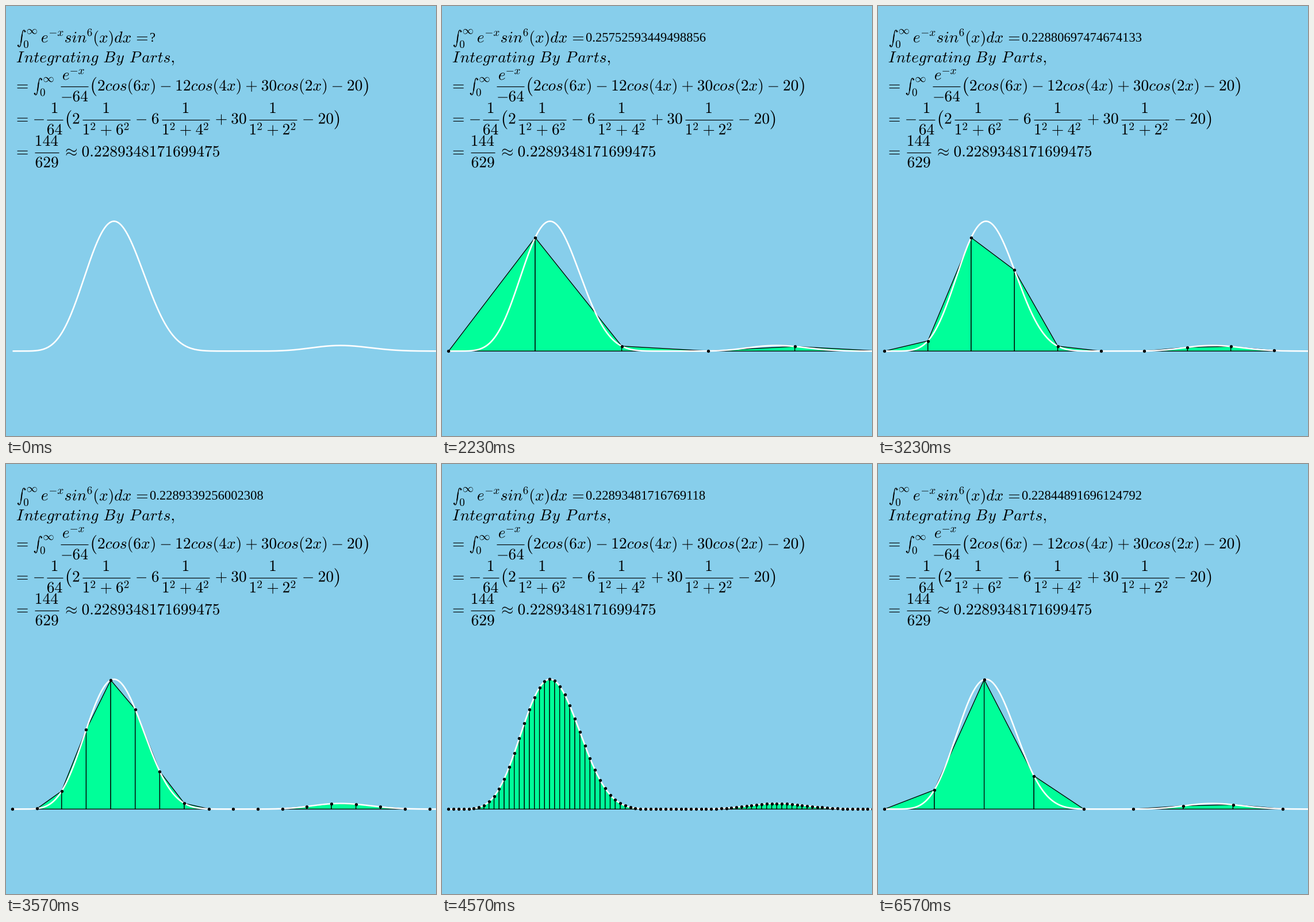
These frames come from a looping animation (748x748 px, 8 s). A matplotlib script:

```python
import math

import matplotlib.pyplot as plt
import numpy as np
from matplotlib.animation import FuncAnimation
from matplotlib.collections import PolyCollection
from matplotlib.patches import Circle, PathPatch
from matplotlib.path import Path
from matplotlib.textpath import TextPath

SIZE, DPI, FPS, FRAMES = 748, 64, 30, 240
PX = 72 / DPI                       # points per pixel
EM = 27.45                          # formula font size
SCRIPT = 0.7 * EM
AXIS = 0.25 * EM                    # height of the math axis above a baseline
X0, BASE, XS, YS = 11.5, SIZE - 600.3, 125.47, 1000

plt.rcParams["mathtext.fontset"] = "cm"
fig = plt.figure(figsize=(SIZE / DPI, SIZE / DPI), dpi=DPI, facecolor="#87ceeb")
ax = fig.add_axes([0, 0, 1, 1])
ax.set(xlim=(0, SIZE), ylim=(0, SIZE))
ax.axis("off")


def f(x):
    return np.exp(-x) * np.sin(x) ** 6


# ---- formula typesetting (x: left or centre of the ink, y: baseline from top)

def put(x, y, tex, size=EM, center=False):
    glyphs = TextPath((0, 0), f"${tex}$", size=size)
    box = glyphs.get_extents()
    left = (box.x0 + box.x1) / 2 if center else box.x0
    path = Path(glyphs.vertices + [x - left, SIZE - y], glyphs.codes)
    ax.add_patch(PathPatch(path, fc="black", lw=0))


def row(y, *items):
    for x, tex in items:
        put(x, y, tex)


def big_paren(x, y, tex):
    put(x, y + 0.2 * AXIS, tex, 1.2 * EM)


def bar(left, right, y):
    ax.plot([left, right], [SIZE - y + AXIS] * 2, color="black", lw=1.15 * PX,
            solid_capstyle="butt")


def above(y):
    return y - 0.677 * EM


def below(y):
    return y + 0.686 * EM


def fraction(left, right, y, num, den):
    mid = (left + right) / 2
    bar(left, right, y)
    put(mid, above(y), num, center=True)
    put(mid, below(y), den, center=True)


def laplace_fraction(left, y, k):
    bar(left, left + 83.2, y)
    put(left + 41.6, above(y), "1", center=True)
    low = below(y)
    row(low, (left + 2.4, "1"), (left + 32.4, "+"), (left + 59.4, k))
    for dx in (14.7, 73):
        put(left + dx, low - 0.289 * EM, "2", SCRIPT)


def integral(x, y):
    """Text-size integral sign with limits 0 and infinity."""
    bottom = SIZE - y + AXIS - 15.15
    half = [(13.6, 27.7), (13.2, 29.1), (12.4, 29.6), (11.7, 29.6),
            (9.4, 29.6), (8.7, 24.3)]
    spine = half + [(7.55, 15.15)] + [(15.1 - a, 30.3 - b) for a, b in half[::-1]]
    verts = np.array(spine) + [x, bottom]
    path = Path(verts, [Path.MOVETO] + [Path.CURVE4] * 12)
    ax.add_patch(PathPatch(path, fc="none", ec="black", lw=1.3 * PX))
    ax.plot([x + 8.4, x + 6.7], [bottom + 21.3, bottom + 9], color="black",
            lw=1.9 * PX)
    for dx, dy in ((13.4, 27.4), (1.7, 2.9)):
        ax.add_patch(Circle((x + dx, bottom + dy), 1.4, fc="black", lw=0))
    put(x + 11.4, y + 9.3, "0", SCRIPT)
    put(x + 17.2, y - 14.7, r"\infty", SCRIPT)


def write_formulas():
    y = 63.4
    integral(19.5, y)
    row(y, (62, "e"), (103, "sin"), (154, "(x)dx"), (227.8, "="))
    put(76, y - 0.413 * EM, "-x", SCRIPT)
    put(141.5, y - 0.413 * EM, "6", SCRIPT)

    row(98.1, (18.7, "I"), (32.5, "nteg"), (85, "r"), (98.3, "ating"),
        (170.4, "B"), (192.2, "y"), (215.9, "P"), (237.3, "ar"), (264.3, "ts,"))

    y = 147
    integral(48.3, y)
    bar(95.3, 143.5, y)
    put(99, above(y), "e")
    put(112.3, above(y) - 0.363 * EM, "-x", SCRIPT)
    row(below(y), (97.3, "-"), (116.6, "64"))
    big_paren(149.5, y, "(")
    row(y, (19.5, "="), (160.3, "2cos(6x)"), (269.6, "-"), (296.6, "12cos(4x)"),
        (418, "+"), (444.9, "30cos(2x)"), (568, "-"), (594.3, "20"))
    big_paren(622, y, ")")

    y = 204.7
    row(y, (19.5, "="), (49.1, "-"), (116.4, "2"), (227.3, "-"), (254, "6"),
        (365.4, "+"), (392.4, "30"), (517.3, "-"), (544, "20"))
    fraction(70.8, 98.6, y, "1", "64")
    big_paren(105.8, y, "(")
    for left, k in ((132.7, "6"), (271, "4"), (422.6, "2")):
        laplace_fraction(left, y, k)
    big_paren(571.5, y, ")")

    y = 261.8
    row(y, (19.5, "="), (104.6, r"\approx"), (132.6, "0.2289348171699475"))
    fraction(50.3, 92, y, "144", "629")


write_formulas()

# ---- plot

areas = PolyCollection([], facecolors="#00ff99", edgecolors="black",
                       linewidths=1.3 * PX, zorder=2)
ax.add_collection(areas)
xs = np.linspace(0, 6, 900)
ax.plot(X0 + XS * xs, BASE + YS * f(xs), color="white", lw=2.6 * PX, zorder=3,
        solid_capstyle="butt")
dots, = ax.plot([], [], "o", color="black", ms=5.4 * PX, mew=0, zorder=4)
answer = PathPatch(Path([(0, 0)]), fc="black", lw=0)
ax.add_patch(answer)

START = 45
STEP_KEYS = [
    (45, 1.49), (50, 1.44), (56, 1.44), (84, 0.77), (88, 0.72), (91, 0.72),
    (107, 0.34), (116, 0.22), (129, 0.11), (136, 0.11), (137, 0.07),
    (157, 0.07), (168, 0.30), (173, 0.30), (174, 0.31), (197, 0.69),
]


def step_at(frame):
    return round(float(np.interp(frame, *zip(*STEP_KEYS))), 2)


def trapezoid_sum(h, end=50):
    total = 0.0
    for k in range(int(end / h)):
        a, b = k * h, (k + 1) * h
        total += (math.exp(-a) * math.sin(a) ** 6
                  + math.exp(-b) * math.sin(b) ** 6) * h / 2
    return total


def draw(frame):
    shown = frame >= START
    h = step_at(frame)
    if shown:
        x = np.arange(int(6 / h) + 2) * h
        px, py = X0 + XS * x, BASE + YS * f(x)
        areas.set_verts([[(a, BASE), (a, p), (b, q), (b, BASE)]
                         for a, b, p, q in zip(px, px[1:], py, py[1:])])
        dots.set_data(px, py)
    else:
        areas.set_verts([])
        dots.set_data([], [])
    label = str(trapezoid_sum(h)) if frame > START else "?"
    answer.set_path(TextPath((250, SIZE - 61.8), label, size=22.6,
                             prop={"family": "Liberation Serif"}))
    return areas, dots, answer


anim = FuncAnimation(fig, draw, frames=FRAMES, interval=1000 / FPS, repeat=True,
                     repeat_delay=0, cache_frame_data=False)
plt.show()
```
